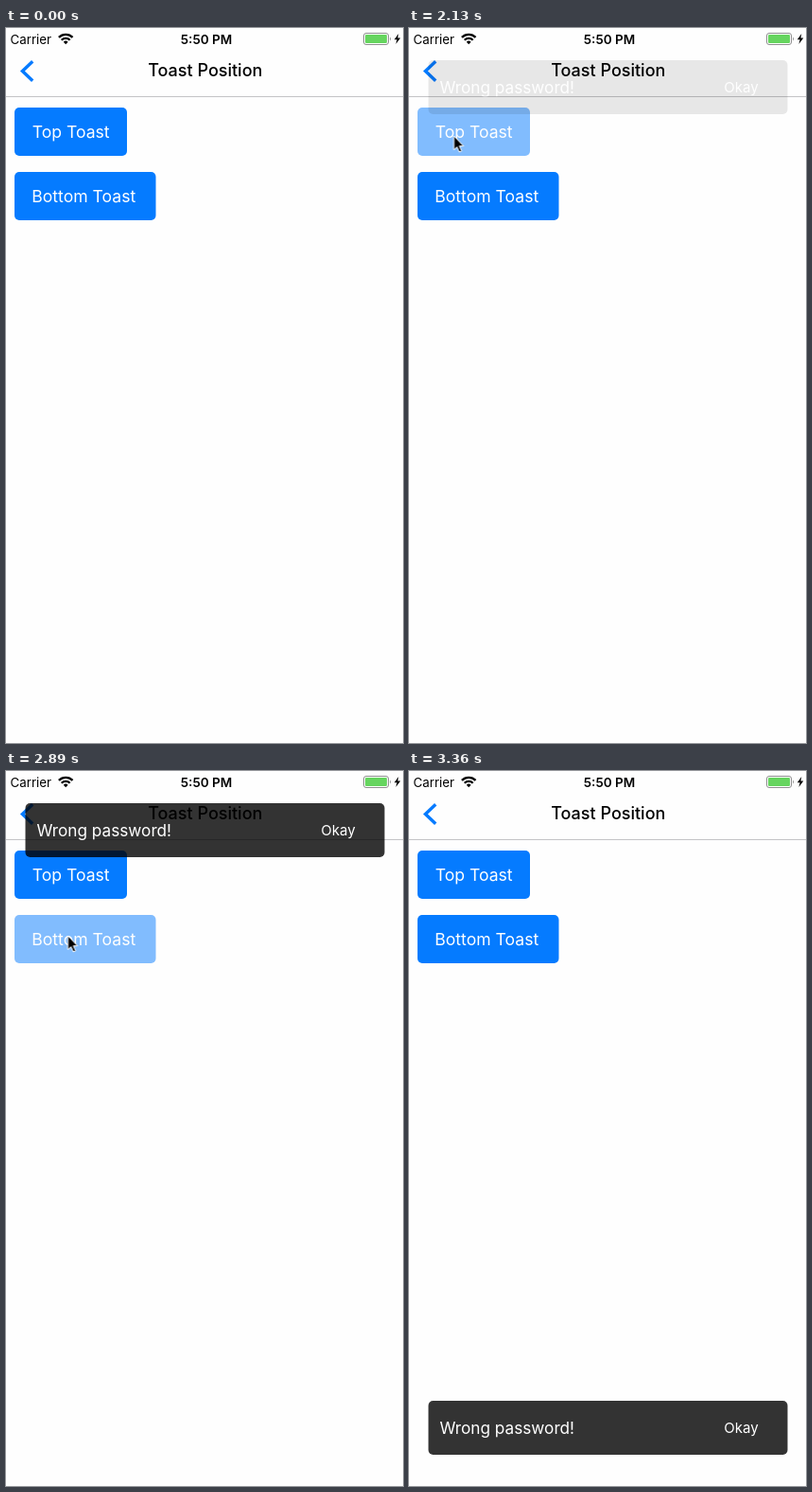
Recreate the animation shown at these times as an HTML page. Size 420x755 px, loop 4.05 s.

```html
<!DOCTYPE html>
<html lang="en">
<head>
<meta charset="utf-8">
<title>Toast Position</title>
<style>
  html, body { margin: 0; height: 100%; overflow: hidden; background: #fefefe; }
  svg { display: block; width: 100vw; height: 100vh; font-family: Inter, "Liberation Sans", sans-serif; }
  .label { font-size: 17.6px; fill: #fff; }
  .button rect { fill: #057bff; }

  /* One shared 4050 ms loop; values hold unless a keyframe sets steps(n). */
  .anim { animation: 4050ms step-end infinite; }
  #cursor { animation-name: cursor; }
  #top { animation-name: press-top; }
  #bottom { animation-name: press-bottom; }
  #toast { animation-name: toast; }

  @keyframes cursor {
    0%     { transform: translate(-40px, 0); }
    34.81% { transform: translate(249.5px, 702px); }
    37.03% { transform: translate(-4px, 285px); }
    37.77% { transform: translate(-40px, 0); }
    44.44% { transform: translate(3.5px, 119.5px); animation-timing-function: steps(5); }
    48.39% { transform: translate(47.5px, 114px); }
    59.50% { transform: translate(47.5px, 114px); animation-timing-function: steps(10); }
    70.12% { transform: translate(65.5px, 174px); }
    76.54% { transform: translate(65.5px, 174px); animation-timing-function: steps(8); }
    82.22% { transform: translate(334px, 745px); }
    82.96%, 100% { transform: translate(-40px, 0); }
  }
  @keyframes press-top {
    0%     { opacity: 1; }
    52.09% { opacity: .5; }
    54.07% { opacity: .62; }
    55.55% { opacity: .78; }
    57.03%, 100% { opacity: 1; }
  }
  @keyframes press-bottom {
    0%     { opacity: 1; }
    71.35% { opacity: .5; }
    74.81% { opacity: .7; }
    76.04% { opacity: .88; }
    77.28%, 100% { opacity: 1; }
  }
  @keyframes toast {
    0%     { opacity: 0; transform: translateY(0); }
    52.59% { opacity: .11; transform: translateY(0); }
    54.07% { opacity: .5; transform: translateY(0); }
    55.55% { opacity: .86; transform: translateY(0); }
    57.03% { opacity: 1; transform: translateY(0); }
    72.59%, 100% { opacity: 1; transform: translateY(631px); }
  }
</style>
</head>
<body>
<svg viewBox="0 0 420 755" preserveAspectRatio="none">
  <rect width="420" height="755" fill="#fefefe"/>

  <!-- Status bar -->
  <text x="4.5" y="16.5" font-size="13.3">Carrier</text>
  <g transform="translate(63.2 17.2)" fill="none" stroke="#000" stroke-width="2.4">
    <path d="M-7.3 -7.3A10.3 10.3 0 0 1 7.3 -7.3M-4.45 -4.45A6.3 6.3 0 0 1 4.45 -4.45"/>
    <path d="M0 0L-2.4 -2.4A3.4 3.4 0 0 1 2.4 -2.4Z" fill="#000" stroke="none"/>
  </g>
  <text x="212" y="16.5" font-size="13.5" font-weight="600" text-anchor="middle">5:50 PM</text>
  <rect x="378.5" y="5.5" width="26" height="12" rx="2.5" fill="none" stroke="#8f8f8f"/>
  <rect x="380" y="7" width="23" height="9" rx="1.2" fill="#66d55f"/>
  <path d="M406 9.5Q408 11.5 406 13.5Z" fill="#8f8f8f"/>
  <path d="M415.3 6L410.8 12.2H413.6L412.4 17L417.3 10.4H414.4Z"/>

  <!-- Header -->
  <path d="M28.2 35.2L17.4 45.5L28.2 55.8" fill="none" stroke="#057bff" stroke-width="3.4"/>
  <text x="210.8" y="51.3" font-size="18" font-weight="500" text-anchor="middle">Toast Position</text>
  <path d="M0 72.5H420" stroke="#c4c4c6"/>

  <g id="top" class="button anim">
    <rect x="9" y="84" width="119" height="51" rx="5"/>
    <text class="label" x="27.7" y="116">Top Toast</text>
  </g>
  <g id="bottom" class="button anim">
    <rect x="9" y="152" width="149.5" height="51" rx="5"/>
    <text class="label" x="27.3" y="184">Bottom Toast</text>
  </g>

  <g id="toast" class="anim">
    <rect x="20.5" y="34" width="380" height="57" rx="5" fill-opacity=".8"/>
    <text class="label" x="32.5" y="69" style="font-size:17.2px">Wrong password!</text>
    <text class="label" x="333.3" y="68.3" style="font-size:15px">Okay</text>
  </g>

  <g id="cursor" class="anim">
    <path d="M0 0V14.6L3.3 11.6L5.8 17L8.2 15.9L5.8 10.7H10.2Z" stroke="#fff"/>
  </g>
</svg>
</body>
</html>
```
